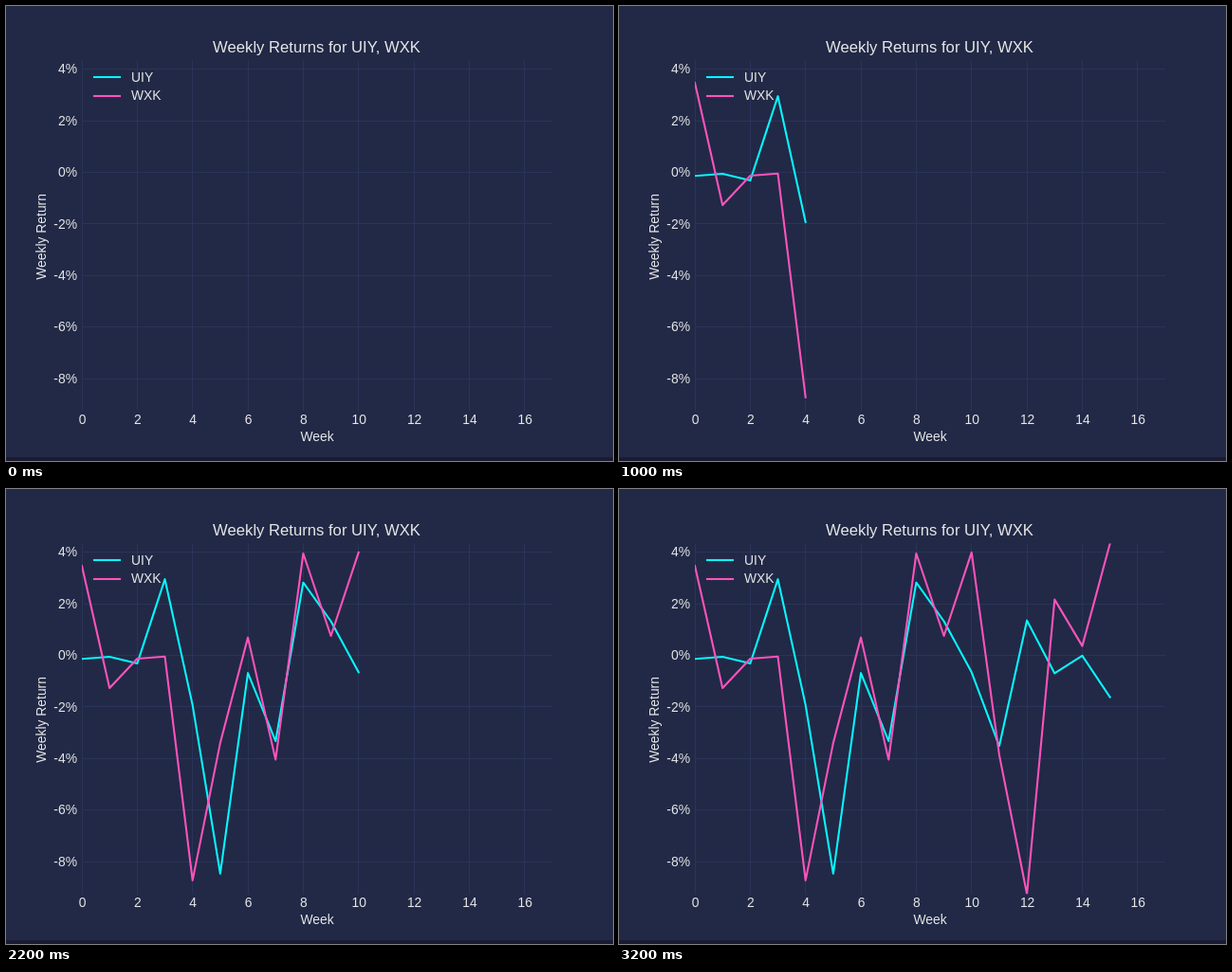
Recreate the animation shown at these times as an HTML page. Size 640 by 480 pixels, loop 3400 ms.

```html
<!DOCTYPE html>
<html lang="en">
<head>
<meta charset="utf-8">
<title>Weekly Returns</title>
<style>
  html, body { margin: 0; width: 100%; height: 100%; overflow: hidden; background: #212946; }
  svg { display: block; width: 640px; height: 480px; }
  text { font: 13.89px "Liberation Sans", Arial, sans-serif; fill: #e6e6e6; }
  .title { font-size: 16.67px; }
  .mid { text-anchor: middle; }
  .end { text-anchor: end; }
  .grid { stroke: #2a3459; stroke-width: 1.11; }
  .line { fill: none; stroke-width: 2.08; stroke-linecap: square; stroke-linejoin: round; }
</style>
</head>
<body>
<svg id="chart" viewBox="0 0 640 480">
  <clipPath id="plot"><rect x="80" y="57.6" width="496" height="369.6"/></clipPath>
  <rect width="640" height="480" fill="#212946"/>
  <rect y="476" width="640" height="4" fill="#1b1a33"/>
</svg>
<script>
const LOOP = 3400, STEP = 200;
const BOX = { left: 80, right: 576, top: 57.6, bottom: 427.2 };
const midX = (BOX.left + BOX.right) / 2;
const midY = (BOX.top + BOX.bottom) / 2;
const series = [
  { name: 'UIY', color: '#08f7fe', data: [-0.14, -0.06, -0.32, 2.95, -1.93, -8.47, -0.69, -3.33,
    2.82, 1.32, -0.66, -3.52, 1.35, -0.7, -0.02, -1.62] },
  { name: 'WXK', color: '#fe53bb', data: [3.47, -1.27, -0.13, -0.05, -8.73, -3.4, 0.69, -4.05,
    3.95, 0.75, 3.99, -3.87, -9.26, 2.16, 0.36, 4.33] }
];

const chart = document.getElementById('chart');
const xAt = week => BOX.left + week * (BOX.right - BOX.left) / 17;
const yAt = percent => 175.4 - percent * 27.2;
const snap = v => Math.floor(v) + 0.5;

function add(tag, attrs, content = '') {
  const el = document.createElementNS('http://www.w3.org/2000/svg', tag);
  for (const key in attrs) el.setAttribute(key, attrs[key]);
  el.textContent = content;
  return chart.appendChild(el);
}

const label = (content, x, y, cls = '', extra = {}) =>
  add('text', { x, y, class: cls, ...extra }, content);
const gridLine = (x1, y1, x2, y2) => add('line', { x1, y1, x2, y2, class: 'grid' });

for (let week = 0; week <= 16; week += 2) {
  const x = snap(xAt(week));
  gridLine(x, BOX.top, x, BOX.bottom);
  label(week, xAt(week) + 0.5, 441, 'mid');
}
for (let percent = 4; percent >= -8; percent -= 2) {
  const y = snap(yAt(percent));
  gridLine(BOX.left, y, BOX.right, y);
  label(percent + '%', 75, Math.round(yAt(percent) + 4.8), 'end');
}

for (const s of series) {
  s.line = add('polyline', { class: 'line', stroke: s.color, 'clip-path': 'url(#plot)' });
}

series.forEach((s, i) => {
  const y = 75 + i * 20;
  add('line', { x1: 93, y1: y, x2: 120, y2: y, class: 'line', stroke: s.color });
  label(s.name, 132, 80 + i * 19);
});
label('Weekly Returns for ' + series.map(s => s.name).join(', '), midX - 0.5, 49, 'title mid');
label('Week', midX, 459, 'mid');
label('Weekly Return', 0, 0, 'mid', { transform: `translate(41.5 ${midY + 1}) rotate(-90)` });

function draw(time) {
  const last = Math.max(0, Math.floor(time % LOOP / STEP) - 1);
  for (const { data, line } of series) {
    const shown = last ? data.slice(0, last + 1) : [];
    line.setAttribute('points', shown.map((v, i) => `${xAt(i)},${yAt(v)}`).join(' '));
  }
}

const start = performance.now();
function tick() {
  draw(performance.now() - start);
  requestAnimationFrame(tick);
}
tick();
</script>
</body>
</html>
```
